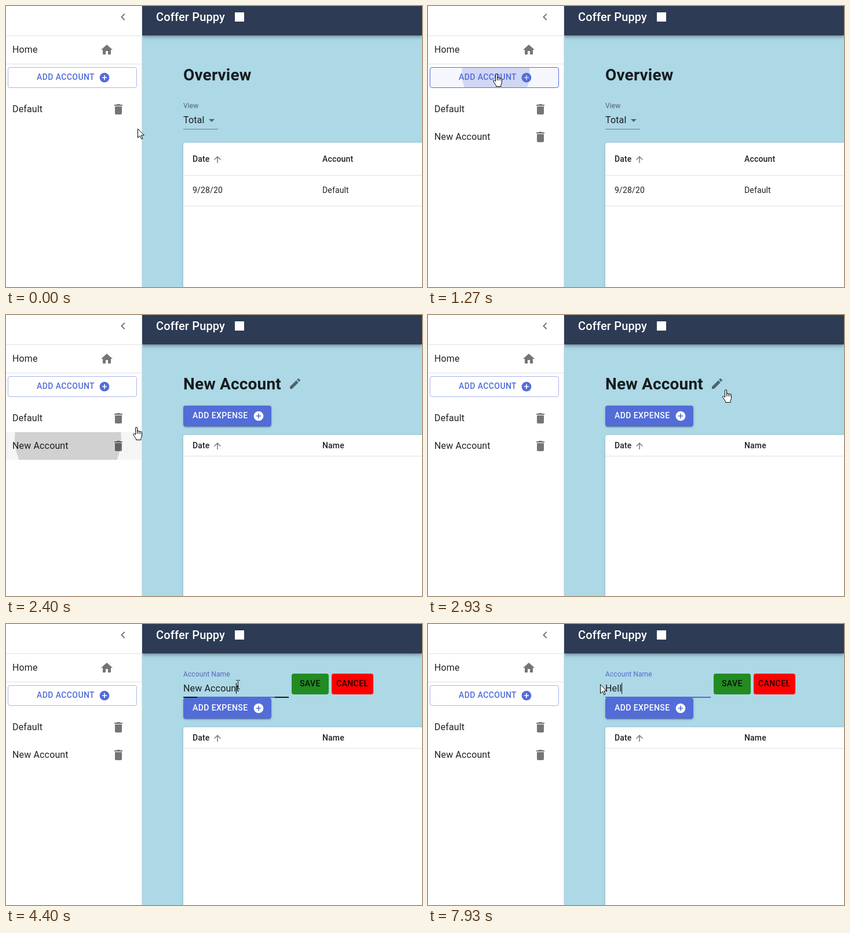
These frames come from a looping animation (718 px wide and 487 px high, 8000 ms). An HTML page:

```html
<!DOCTYPE html>
<html lang="en">
<head>
<meta charset="utf-8">
<title>Expense tracker</title>
<style>
html, body { margin: 0; width: 100%; height: 100%; overflow: hidden; }
#stage { position: relative; width: 718px; height: 487px; overflow: hidden; background: #add8e6;
  --main: #526cd8; --ink: rgba(0,0,0,.87); --dim: rgba(0,0,0,.54); }
#stage div { position: absolute; box-sizing: border-box; }
.layer, svg { position: absolute; left: 0; top: 0; width: 718px; height: 487px; }
text { font: 400 16px Roboto, sans-serif; letter-spacing: .15px; fill: var(--ink); white-space: pre; }
.h1 { font-size: 28px; font-weight: 700; }
.title { font-size: 20px; font-weight: 500; fill: #fff; }
.small { font-size: 12px; letter-spacing: .11px; fill: var(--dim); }
.cell { font-size: 14px; }
.head { font-size: 14px; font-weight: 500; }
.btn { font-size: 14px; font-weight: 500; letter-spacing: .4px; }
.main { fill: var(--main); }
.white { fill: #fff; }
.dim { fill: var(--dim); }
.raised { border-radius: 4px; box-shadow: 0 3px 1px -2px rgba(0,0,0,.2), 0 2px 2px rgba(0,0,0,.14), 0 1px 5px rgba(0,0,0,.12); }
.bar { box-shadow: 0 2px 4px -1px rgba(0,0,0,.2), 0 4px 5px rgba(0,0,0,.14), 0 1px 10px rgba(0,0,0,.12); }
.clip { overflow: hidden; border-radius: 4px; }
.ripple { border-radius: 50%; }
</style>
</head>
<body>
<div id="stage"></div>
<script>
const LOOP = 8000;
const OPEN = 2070, EDIT = 3330, FOCUS = 4325, DRAG = 4420;

const ICON = {
  back: 'M15.41 7.41L14 6l-6 6 6 6 1.41-1.41L10.83 12z',
  home: 'M10 20v-6h4v6h5v-8h3L12 3 2 12h3v8z',
  plus: 'M12 2C6.48 2 2 6.48 2 12s4.48 10 10 10 10-4.48 10-10S17.52 2 12 2zm5 11h-4v4h-2v-4H7v-2h4V7h2v4h4v2z',
  bin: 'M6 19c0 1.1.9 2 2 2h8c1.1 0 2-.9 2-2V7H6v12zM19 4h-3.5l-1-1h-5l-1 1H5v2h14V4z',
  up: 'M4 12l1.41 1.41L11 7.83V20h2V7.83l5.58 5.59L20 12l-8-8-8 8z',
  down: 'M7 10l5 5 5-5z',
  pen: 'M3 17.25V21h3.75L17.81 9.94l-3.75-3.75L3 17.25zM20.71 7.04c.39-.39.39-1.02 0-1.41l-2.34-2.34c-.39-.39-1.02-.39-1.41 0l-1.83 1.83 3.75 3.75 1.83-1.83z'
};

// Markup helpers
const box = (x, y, w, h, css = '', attr = '', inner = '') =>
  `<div ${attr} style="left:${x}px;top:${y}px;width:${w}px;height:${h}px;${css}">${inner}</div>`;
const text = (x, y, s, cls = '') => `<text x="${x}" y="${y}" class="${cls}">${s}</text>`;
const icon = (name, x, y, size = 24, cls = 'dim') =>
  `<path d="${ICON[name]}" class="${cls}" transform="translate(${x} ${y}) scale(${size / 24})"/>`;
const svg = (inner, attr = '') => `<svg ${attr}>${inner}</svg>`;
const layer = (id, inner) => `<div id="${id}" class="layer">${inner}</div>`;
const rule = (x, y, w) => box(x, y, w, 1, 'background:#e0e0e0');
const raised = 'class="raised"';

const home = layer('home',
  box(306, 213, 60, 1, 'background:rgba(0,0,0,.42)') +
  box(306, 237, 600, 400, 'background:#fff', raised) +
  rule(306, 293, 412) + rule(306, 346, 412) +
  svg(text(306, 129, 'Overview', 'h1') + text(306, 177, 'View', 'small') +
    text(306, 203, 'Total') + icon('down', 343, 186) +
    text(322, 270, 'Date', 'head') + icon('up', 356, 257, 18) + text(546, 270, 'Account', 'head') +
    text(322, 324, '9/28/20', 'cell') + text(546, 324, 'Default', 'cell')));

const account = layer('account',
  box(306, 157, 152, 36, 'background:var(--main)', raised) +
  box(306, 208, 600, 400, 'background:#fff', raised) +
  rule(306, 244, 412) +
  svg(text(322, 179, 'ADD EXPENSE', 'btn white') + icon('plus', 426, 165, 20, 'white') +
    text(322, 231, 'Date', 'head') + icon('up', 356, 218, 18) + text(546, 231, 'Name', 'head')));

const heading = svg(text(306, 129, 'New Account', 'h1') + icon('pen', 487, 107), 'id="heading"');

const form = layer('form',
  box(493, 86, 64, 36, 'background:#228b22;border-radius:4px') +
  box(562, 86, 72, 36, 'background:red;border-radius:4px') +
  box(306, 126, 182, 2, '', 'id="line"') +
  box(306, 126, 182, 2, 'background:var(--main)', 'id="focus"') +
  box(306, 102, 0, 19, 'background:#0078d7', 'id="mark"') +
  svg(text(306, 91, 'Account Name', 'small').replace('<text', '<text id="label"') +
    text(306, 117, '<tspan id="pre"></tspan><tspan id="sel" class="white"></tspan><tspan id="post"></tspan>') +
    text(507, 108, 'SAVE', 'btn') + text(570, 108, 'CANCEL', 'btn')) +
  box(306, 102, 1, 19, 'background:#000', 'id="caret"'));

const header = box(235, 0, 483, 51, 'background:#2e3b55', 'class="bar"') +
  svg(text(259, 26, 'Coffer Puppy', 'title') + '<rect x="395" y="11" width="16" height="16" fill="#fff"/>');

const ripple = (id, x, y, d, color) =>
  box(x - d / 2, y - d / 2, d, d, `background:${color}`, `id="${id}" class="ripple"`);

const sidebar = box(0, 0, 235, 487, 'background:#fff;border-right:1px solid #e0e0e0') +
  rule(0, 51, 234) + rule(0, 100, 234) +
  box(3, 106, 223, 36, 'border:1px solid', 'id="add" class="clip"', ripple('addRipple', 113, 11, 240, 'var(--main)')) +
  box(0, 155, 234, 48, 'background:#000', 'id="row1"') +
  box(0, 203, 234, 48, 'background:#000', 'id="row2"') +
  box(0, 203, 234, 48, 'border-radius:0', 'class="clip"', ripple('rowRipple', 107, 11, 262, '#222')) +
  svg(icon('back', 190, 7) + text(11, 81, 'Home') + icon('home', 162, 64) +
    text(53, 128, 'ADD ACCOUNT', 'btn main') + icon('plus', 160, 114, 20, 'main') +
    text(11, 184, 'Default') + icon('bin', 182, 167) +
    `<g id="added">${text(11, 232, 'New Account')}${icon('bin', 182, 215)}</g>`);

const cursors = svg(`<g id="arrow" fill="#fff" stroke="#000">
    <path d="M.5 .8V16.3L4.2 12.9 6.9 18.6 9 17.7 6.5 12H11.3Z"/></g>
  <g id="hand" fill="#fff" stroke="#000"><g transform="translate(-5 0)">
    <path d="M4.5 13.5V2a1.5 1.5 0 0 1 3 0V8a1.4 1.4 0 0 1 2.8 .3a1.4 1.4 0 0 1 2.7 .7a1.3 1.3 0 0 1 2.5 .8V15q0 2-1.5 4.5V22.5H5.5V20.5L1 14q-1-1.5 .3-2.2q1-.4 2 .7z"/>
    <path d="M7.5 8v4M10.3 8.5v3.5M13 9.2v3" fill="none"/></g></g>
  <g id="beam" fill="none" stroke="#222"><path d="M-3 -7.5H0M1 -7.5H4M.5 -7V7M-3 7.5H0M1 7.5H4"/></g>`);

const stage = document.getElementById('stage');
stage.innerHTML = home + account + heading + form + header + sidebar + cursors;
const el = {};
stage.querySelectorAll('[id]').forEach(e => el[e.id] = e);

// Timing helpers
const clamp = v => Math.min(1, Math.max(0, v));
const smooth = v => v * v * (3 - 2 * v);
const ramp = (t, start, time) => clamp((t - start) / time);
const pulse = (t, on, off, time) => smooth(ramp(t, on, time)) * (1 - smooth(ramp(t, off, time)));
const show = (e, on) => { e.style.visibility = on ? 'visible' : 'hidden'; };
const within = (x, y, l, t, r, b) => x >= l && x < r && y >= t && y < b;

// Ease-out matching cubic-bezier(0, 0, .2, 1)
function easeOut(p) {
  let lo = 0, hi = 1;
  for (let i = 0; i < 20; i++) {
    const s = (lo + hi) / 2;
    if (.6 * (1 - s) * s * s + s ** 3 < p) lo = s; else hi = s;
  }
  return 3 * (1 - lo) * lo * lo + lo ** 3;
}

// Pointer stops: time, x, y
const PATH = [
  [0, 227, 212], [670, 117, 117], [1450, 117, 117], [1730, 107, 214], [2150, 107, 214],
  [2870, 524, 144], [2930, 513, 129], [3130, 497, 115], [3900, 497, 115], [4250, 400, 105],
  [4400, 400, 105], [4670, 305, 104], [4780, 305, 104], [5000, 297, 104], [LOOP, 297, 104]
];

function pointer(t) {
  const i = PATH.findIndex(p => p[0] > t);
  const [t0, x0, y0] = PATH[i - 1], [t1, x1, y1] = PATH[i];
  const k = smooth((t - t0) / (t1 - t0));
  return [Math.round(x0 + (x1 - x0) * k), Math.round(y0 + (y1 - y0) * k)];
}

function pointerKind(t, x, y) {
  if (x < 235) {
    return within(x, y, 3, 106, 226, 142) || within(x, y, 0, 155, 234, t < 1070 ? 203 : 251) ? 'hand' : 'arrow';
  }
  if (t < OPEN) return 'arrow';
  if (t < EDIT) {
    return within(x, y, 306, 157, 458, 193) || Math.hypot(x - 499, y - 119) < 24 ? 'hand' : 'arrow';
  }
  if (within(x, y, 493, 86, 557, 122)) return 'hand';
  return within(x, y, 306, 96, 488, 128) ? 'beam' : 'arrow';
}

function drawRipple(e, t, start) {
  e.style.transform = `scale(${smooth(ramp(t, start, 550))})`;
  e.style.opacity = t < start ? 0 : .3 * (1 - smooth(ramp(t, start + 100, 550)));
}

// Typed value and caret index by time
const VALUES = [[0, 'New Account', 10], [5670, 't', 0], [6470, 't', 1], [6800, '', 0],
  [7530, 'H', 1], [7670, 'He', 2], [7730, 'Hel', 3], [7930, 'Hell', 4]];
const CARET_ON = [[FOCUS, DRAG], [5670, 6200], [6470, 7000], [7530, LOOP]];

function width(n) {
  return n ? el.pre.parentNode.getSubStringLength(0, n) : 0;
}

function drawField(t, x) {
  const [, value, caret] = VALUES.filter(v => v[0] <= t).pop();
  el.pre.textContent = value;
  el.sel.textContent = el.post.textContent = '';
  const end = width(caret);
  let from = caret;
  if (t >= DRAG && t < 5670) {
    while (from > 0 && 306 + (width(from) + width(from - 1)) / 2 > x) from--;
  }
  const start = width(from);
  el.mark.style.left = 306 + start + 'px';
  el.mark.style.width = end - start + 'px';
  el.pre.textContent = value.slice(0, from);
  el.sel.textContent = value.slice(from, caret);
  el.post.textContent = value.slice(caret);
  el.caret.style.left = Math.round(306 + end) + 'px';
  show(el.caret, t >= EDIT && CARET_ON.some(([a, b]) => t >= a && t < b));

  const hover = t >= 3960;
  el.line.style.top = hover ? '126px' : '127px';
  el.line.style.height = hover ? '2px' : '1px';
  el.line.style.background = `rgba(0,0,0,${.42 + .45 * ramp(t, 3960, 200)})`;
  const f = easeOut(ramp(t, FOCUS, 200));
  el.focus.style.transform = `scaleX(${f})`;
  el.label.style.fill = `color-mix(in srgb, var(--main) ${f * 100}%, rgba(0,0,0,.54))`;
}

function render(t) {
  const [x, y] = pointer(t), kind = pointerKind(t, x, y);
  for (const k of ['arrow', 'hand', 'beam']) {
    show(el[k], k === kind);
    el[k].setAttribute('transform', `translate(${x} ${y})`);
  }
  show(el.home, t < OPEN);
  show(el.account, t >= OPEN);
  show(el.heading, t >= OPEN && t < EDIT);
  show(el.form, t >= EDIT);
  show(el.added, t >= 1070);
  el.account.style.transform = t >= EDIT ? 'translateY(-29px)' : 'none';

  const h = pulse(t, 400, 1560, 250);
  el.add.style.borderColor = `rgba(82,108,216,${.5 + .5 * h})`;
  el.add.style.backgroundColor = `rgba(82,108,216,${.05 * h})`;
  el.row1.style.opacity = .04 * pulse(t, 1570, 1725, 150);
  el.row2.style.opacity = .04 * pulse(t, 1760, 2400, 150);
  drawRipple(el.addRipple, t, 1000);
  drawRipple(el.rowRipple, t, 2050);
  drawField(t, x);
}

const began = performance.now();
function tick() {
  render((performance.now() - began) % LOOP);
  requestAnimationFrame(tick);
}
tick();
</script>
</body>
</html>
```
